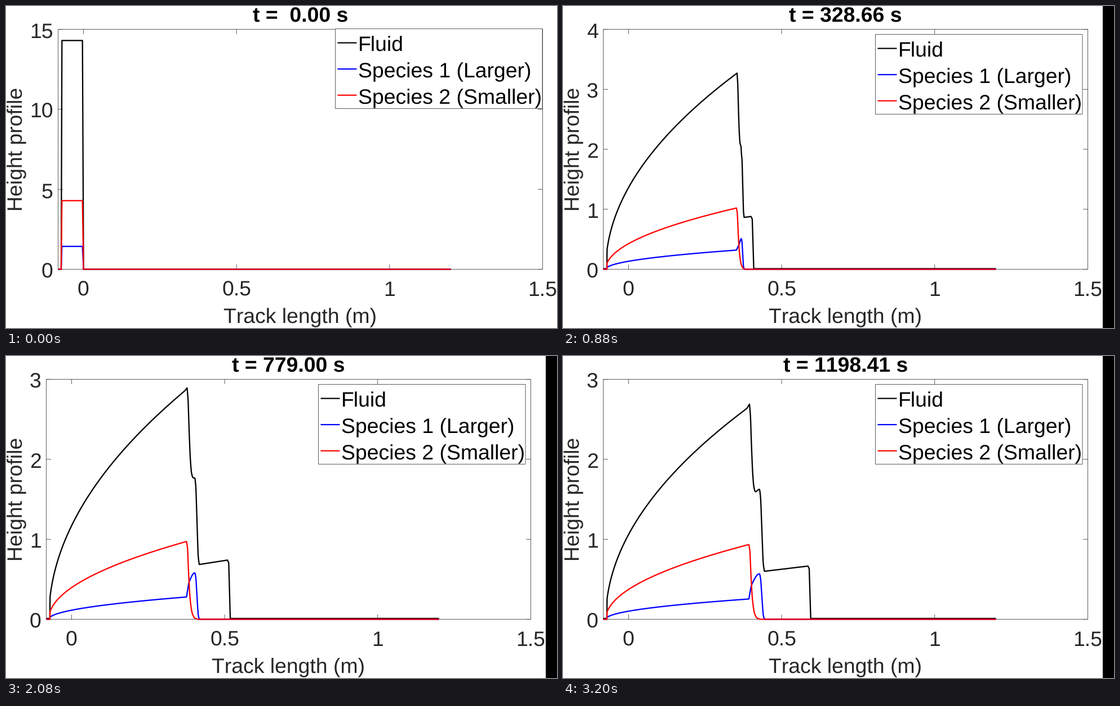
Write a matplotlib script that moves like this. It is 978 px wide and 573 px high and loops after 3.28 s.

```python
import numpy as np
import matplotlib.pyplot as plt
from matplotlib.animation import FuncAnimation
from matplotlib.patches import Rectangle

W, H, DPI = 978, 573, 96
FRAMES, STEP = 41, 80
TOP, BOTTOM, WIDTH = 41.5, 468.5, 860
X_MIN, X_MAX, X_END = -0.0825, 1.5, 1.2
UNIT = WIDTH / (X_MAX - X_MIN)  # pixels per metre of track
ORIGIN, BACK = -0.0745, -0.0703  # apex of the rear curve, first wet point
FILM = 0.010                    # thin film ahead of the front
INK = "#262626"
BLACK, BLUE, RED = "#000000", "#0000ff", "#ff0000"

plt.rcParams.update({
    "font.family": "Liberation Sans",
    "font.size": 28,
    "text.kerning_factor": 6,
    "text.hinting": "none",
    "path.snap": False,
})

# Simulated seconds at a few steps of the run
KEY_STEP = [0, 3, 11, 20, 26, 30, 40]
KEY_TIME = [0, 89.95, 328.66, 599.29, 779.00, 898.91, 1198.41]

# Shape of the flow at every key time after the release
SHAPE = {
    "peak_x":  [.277, .3545, .369, .3775, .382, .395],
    "peak_h":  [4.19, 3.27, 3.0, 2.88, 2.81, 2.66],
    "tip":     [0, 0, 0, .012, .02, .03],
    "dip_x":   [.2822, .3674, .3876, .3969, .4015, .4144],
    "dip_h":   [2.6, 2.04, 1.87, 1.77, 1.71, 1.595],
    "shelf_x": [.2827, .3683, .3904, .4024, .4098, .4273],
    "shelf_h": [2.5, 1.95, 1.82, 1.765, 1.72, 1.625],
    "foot_x":  [.2864, .3775, .4024, .4171, .4236, .4438],
    "foot_h":  [.02, .865, .74, .685, .655, .60],
    "front_x": [.2875, .409, .4797, .5184, .5414, .595],
    "front_h": [.02, .88, .785, .74, .715, .665],
    "knee_h":  [.40, .42, .46, .47, .46, .43],
    "hump_h":  [.22, .51, .57, .58, .577, .568],
    "tail":    [.015, .031, .037, .037, .037, .037],
    "small":   [.3, .313, .33, .3385, .343, .352],
    "large":   [.1, .098, .098, .097, .0965, .0955],
}


def shape_at(t):
    t0, t1 = KEY_TIME[1:3]
    if t <= t0:
        # one undivided front, spreading with the cube root of time
        grow = (t / t0) ** (1 / 3)
        shift = (SHAPE["peak_x"][0] - ORIGIN) * (grow - 1)
        out = {}
        for name, row in SHAPE.items():
            v = row[0]
            if name.endswith("_x"):
                v += shift
            elif name.endswith("_h"):
                v /= grow
            out[name] = v
        return out

    logs = np.log(KEY_TIME[1:])
    out = {}
    for name, row in SHAPE.items():
        if t < t1:
            rate = 2.0 if name == "front_x" else 3.2
            s = (t - t0) / (t1 - t0)
            s = (1 - np.exp(-rate * s)) / (1 - np.exp(-rate))
            out[name] = row[0] + s * (row[1] - row[0])
        else:
            out[name] = np.interp(np.log(t), logs, row)
    return out


def monotone(points, per_span=14):
    """Smooth curve through the points without overshoot."""
    x, y = np.array(points, float).T
    dx = np.diff(x)
    d = np.diff(y) / dx
    a, b = d[:-1], d[1:]
    same = a * b > 0
    mid = np.where(same, 2 * a * b / np.where(same, a + b, 1), 0)
    m = np.concatenate([d[:1], mid, d[-1:]])
    u = np.linspace(0, 1, per_span)[:, None]
    cx = x[:-1] + u * dx
    cy = ((2 * u**3 - 3 * u**2 + 1) * y[:-1] + (3 * u**2 - 2 * u**3) * y[1:]
          + dx * ((u**3 - 2 * u**2 + u) * m[:-1] + (u**3 - u**2) * m[1:]))
    return cx.T.ravel(), cy.T.ravel()


def drop(x0, y0, x1, y1, profile):
    return [(x0 + u * (x1 - x0), y0 + v * (y1 - y0)) for u, v in profile]


STEEP = [(0, 0), (.15, .12), (.35, .5), (.55, .8), (.75, .95), (1, 1)]
SOFT = [(0, 0), (.22, .09), (.5, .5), (.78, .91), (1, 1)]
LONG = [(0, 0), (.08, .07), (.18, .4), (.32, .74), (.5, .92), (.73, .985), (1, 1)]
EDGE = [(0, 0), (.45, .05), (1, 1)]


def join(base, *parts):
    ends = ([X_MIN, BACK - .0005], [base, base]), ([X_END], [base])
    x, y = (np.concatenate(c) for c in zip(ends[0], *parts, ends[1]))
    return x, np.maximum(y, base)


def block(height):
    x = np.array([X_MIN, -.0725, -.07, -.003, .0005, X_END])
    return x, np.array([0, 0, 1, 1, 0, 0]) * height


def profiles(t):
    """Curves of fluid, larger and smaller grains, and the highest value."""
    if t == 0:
        return [block(14.3), block(1.43), block(4.29)], 14.3

    p = shape_at(t)
    px, ph = p["peak_x"], p["peak_h"]
    sx, fx = p["shelf_x"], p["foot_x"]

    def back(scale, end, tip=0.0):
        u = np.linspace(0, 1, 120) ** 2
        x = BACK + u * (end - BACK)
        h = ph * np.sqrt((x - ORIGIN) / (px - ORIGIN))
        return x, scale * h + tip * np.exp((x - px) / .003)

    rear = back(1, px, p["tip"])
    fall = monotone(drop(px, rear[1][-1], p["dip_x"], p["dip_h"], STEEP)
                    + drop(sx, p["shelf_h"], fx, p["foot_h"], SOFT))
    front = max(p["front_x"], fx + .0008)
    lip = max(fx + .0003, front - .009)
    nose = np.array(drop(lip, p["front_h"], front, FILM, EDGE)).T
    fluid = join(FILM, rear, fall, nose)

    rear = back(p["large"], px - .002)
    knee = px + min(.007, (sx - px) / 2)
    large = join(0, rear, monotone(
        [(px - .002, rear[1][-1]), (knee, p["knee_h"])]
        + drop(sx, p["hump_h"], fx, 0, SOFT)))

    rear = back(p["small"], px - .002)
    small = join(0, rear, monotone(
        drop(px - .002, rear[1][-1], px - .002 + p["tail"], 0, LONG)))
    return [fluid, large, small], ph + p["tip"]


def y_scale(peak):
    for floor, top, tick in [(8, 15, 5), (5, 8, 2), (4, 5, 1),
                             (3.2, 4, 1), (3.005, 3.5, 1)]:
        if peak > floor:
            return top, tick
    return 3, 1


fig = plt.figure(figsize=(W / DPI, H / DPI), dpi=DPI, facecolor="white")
ax = fig.add_axes([0, 0, 1, 1])


def line(x, y, color=INK, px=0.75, z=2):
    ax.plot(x, y, color=color, lw=px * 0.75, zorder=z,
            solid_joinstyle="round", solid_capstyle="butt")


def label(x, y, s, ha="center", color=INK, **kw):
    ax.text(x, y, s, ha=ha, va="baseline", color=color, zorder=8, **kw)


def draw_axes(left, top, tick):
    right, size = left + WIDTH, 8.5
    ax.add_patch(Rectangle((left, TOP), WIDTH, BOTTOM - TOP, fill=False,
                           ec=INK, lw=0.56, zorder=2))
    for v in (0, .5, 1, 1.5):
        x = left + (v - X_MIN) * UNIT
        if v < X_MAX:
            line([x, x], [BOTTOM, BOTTOM - size])
            line([x, x], [TOP, TOP + size])
        label(x, 516, f"{v:g}")
    for v in range(0, int(top) + 1, tick):
        y = BOTTOM - v / top * (BOTTOM - TOP)
        line([left, left + size], [y, y])
        line([right, right - size], [y, y])
        label(left - 9, y + 15.3, str(v), ha="right")
    label(left + WIDTH / 2, 564.3, "Track length (m)")
    label(29.5, 255, "Height profile", rotation=90, rotation_mode="anchor")


def draw_legend(x, y):
    ax.add_patch(Rectangle((x, y), 367.5, 142, fc="white", ec=INK,
                           lw=0.56, zorder=6))
    rows = [("Fluid", BLACK), ("Species 1 (Larger)", BLUE),
            ("Species 2 (Smaller)", RED)]
    for i, (name, color) in enumerate(rows):
        dy = y + 46.6 * i
        line([x + 4, x + 38], [dy + 25, dy + 25], color, 2.2, z=7)
        label(x + 40.7, dy + 40.3, name, ha="left", color="black")


def draw(i):
    ax.clear()
    ax.set(xlim=(0, W), ylim=(H, 0))
    ax.axis("off")

    t = np.interp(i, KEY_STEP, KEY_TIME)
    curves, peak = profiles(t)
    top, tick = y_scale(peak)
    left = 92.5 if top >= 10 else 71.5

    draw_axes(left, top, tick)
    for z, ((x, h), color) in enumerate(zip(curves, (BLACK, BLUE, RED)), 3):
        line(left + (x - X_MIN) * UNIT,
             BOTTOM - h / top * (BOTTOM - TOP), color, 2.3, z)
    if top >= 10:
        draw_legend(584.5, 40.5)
    else:
        draw_legend(554.5, 50.5)
        ax.add_patch(Rectangle((958, 0), W - 958, H, fc="black", lw=0, zorder=9))
    label(left + WIDTH / 2, 28.7, f"t = {t:5.2f} s", color="black", weight="bold")
    return ax.get_children()


anim = FuncAnimation(fig, draw, frames=FRAMES, init_func=lambda: [],
                     interval=STEP, repeat=True, repeat_delay=0)
plt.show()
```
